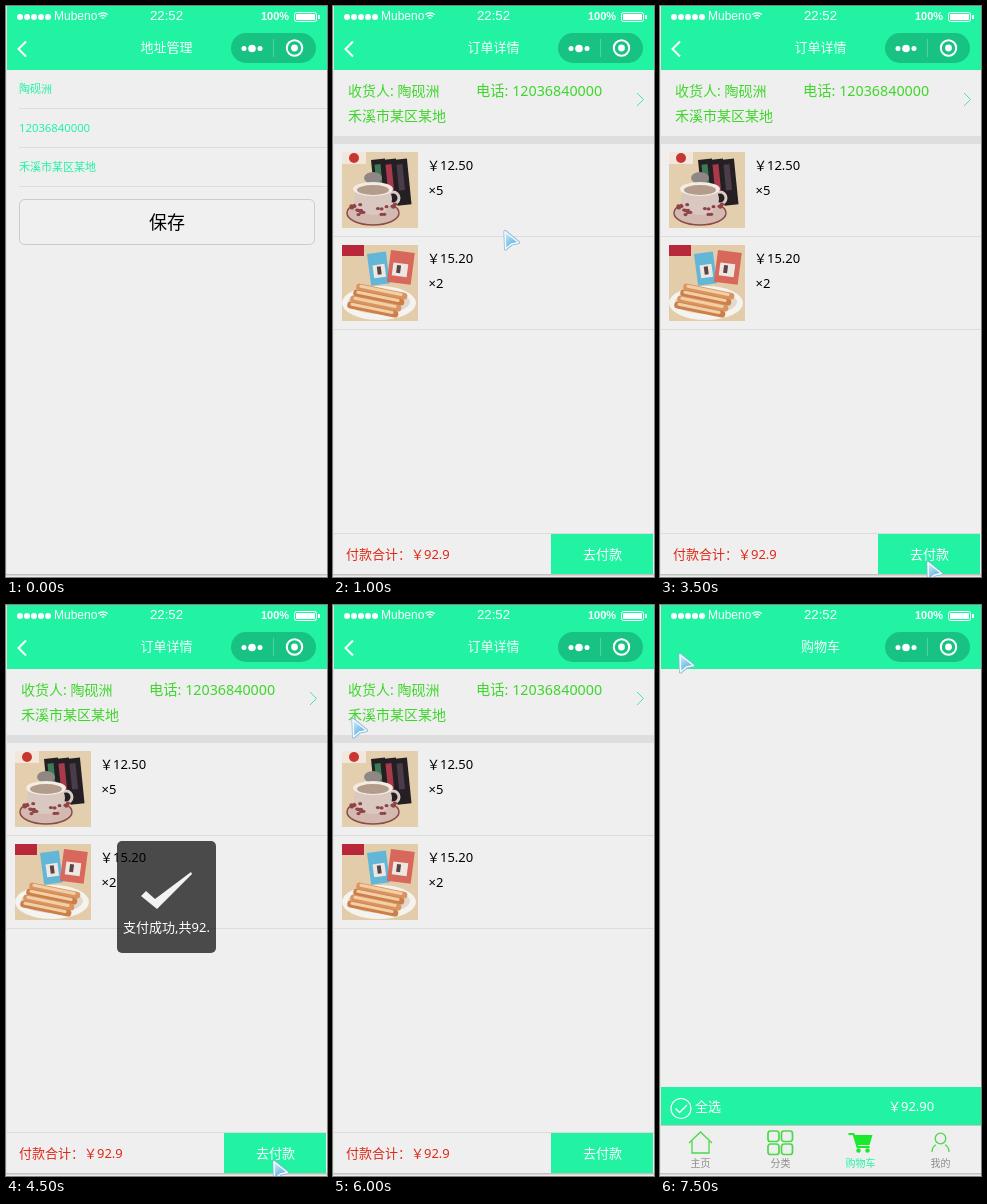
Recreate the animation shown at these times as an HTML page with a canvas. Size 321x571 px, loop 8000 ms.

```html
<!DOCTYPE html>
<html lang="zh-CN">
<head>
<meta charset="utf-8">
<title>订单支付</title>
<style>
html, body { margin: 0; width: 100%; height: 100%; overflow: hidden; background: #efefef; }
canvas { display: block; width: 321px; height: 571px; }
</style>
</head>
<body>
<canvas id="stage"></canvas>
<script>
const W = 321, H = 571, LOOP = 8000, MID = 160.5;
const MINT = '#22f3a3', PAPER = '#efefef', LINE = '#dcdcdc', GREEN = '#3fd62c';
const WHITE = '#fff', ICON = '#49d94b', CART = '#18ea2c';
const UI = '"Noto Sans", "Noto Sans CJK SC", "Noto Sans CJK", sans-serif';
const ARIAL = '"Liberation Sans", Arial, sans-serif';
const USER = '陶砚洲', PHONE = '12036840000', PLACE = '禾溪市某区某地', CARRIER = 'Mubeno';

const canvas = document.getElementById('stage');
const ratio = window.devicePixelRatio || 1;
canvas.width = W * ratio;
canvas.height = H * ratio;
const c = canvas.getContext('2d');
c.scale(ratio, ratio);

function times(n, draw) {
  for (let i = 0; i < n; i++) draw(i);
}

function seeded(seed) {
  return () => (seed = seed * 16807 % 2147483647) / 2147483647;
}

function rect(x, y, w, h, fill) {
  c.fillStyle = fill;
  c.fillRect(x, y, w, h);
}

function paint(fill, stroke, width = 1) {
  if (fill) { c.fillStyle = fill; c.fill(); }
  if (stroke) { c.strokeStyle = stroke; c.lineWidth = width; c.stroke(); }
}

function round(x, y, w, h, r, fill, stroke, width) {
  c.beginPath();
  c.roundRect(x, y, w, h, r);
  paint(fill, stroke, width);
}

function oval(x, y, rx, ry, fill, stroke, width) {
  c.beginPath();
  c.ellipse(x, y, rx, ry, 0, 0, 7);
  paint(fill, stroke, width);
}

function arc(x, y, r, from, to, stroke, width) {
  c.beginPath();
  c.arc(x, y, r, from, to);
  paint(null, stroke, width);
}

function path(points, fill, stroke, width) {
  c.beginPath();
  points.forEach(p => c.lineTo(...p));
  if (fill) c.closePath();
  paint(fill, stroke, width);
}

// (x, y) is the point of the arrow; a positive width opens to the right
function chevron(x, y, w, h, color, width) {
  path([[x + w, y - h], [x, y], [x + w, y + h]], null, color, width);
}

// Draws inside a local frame, leaning by the given angle
function place(x, y, angle, draw) {
  c.save();
  c.translate(x, y);
  c.rotate(angle);
  draw();
  c.restore();
}

// y is the vertical centre of the glyphs
function text(s, x, y, size, color, align = 'left', font = UI, weight = '') {
  c.font = `${weight} ${size}px ${font}`;
  c.textAlign = align;
  c.fillStyle = color;
  c.fillText(s, x, y + size * 0.37);
}

function statusBar() {
  times(5, i => oval(14 + i * 7, 11, 3, 3, WHITE));
  text(CARRIER, 48, 9.8, 12, WHITE, 'left', ARIAL);
  times(3, i => arc(97, 14, 2 + i * 2.6, -2.3, -0.84, WHITE, 1.3));
  text('22:52', MID, 9.5, 13.2, WHITE, 'center', ARIAL);
  text('100%', 255, 10.3, 11, WHITE, 'left', ARIAL, 'bold');
  round(288.5, 6.5, 22, 9, 2, null, WHITE);
  rect(290, 8, 19, 6, WHITE);
  rect(312, 9, 2, 4, WHITE);
}

function header(title, back) {
  rect(1, 0, 320, 64, MINT);
  statusBar();
  text(title, MID, 41.5, 13, '#f4fffb', 'center');
  if (back) chevron(12.5, 43, 7.5, 7.5, WHITE, 2);

  round(225, 27, 85, 30, 15, '#18c283');
  times(3, i => oval(238 + i * 8, 42.5, i === 1 ? 3.8 : 2.5, i === 1 ? 3.8 : 2.5, WHITE));
  rect(267, 33, 1, 18, '#4bd3a2');
  oval(288.5, 42, 7.7, 7.7, null, WHITE, 2);
  oval(288.5, 42, 3.4, 3.4, WHITE);
}

function addressPage() {
  header('地址管理', true);
  [USER, PHONE, PLACE].forEach((s, i) => {
    text(s, 13, 83 + i * 39, s === PHONE ? 11.3 : 11, MINT);
    rect(13, 102 + i * 39, 308, 1, LINE);
  });
  round(13.5, 193.5, 295, 45, 5, '#f0f0f0', '#cbcbcb');
  text('保存', 161, 216, 18, '#000', 'center');
}

// Product photos are drawn in a 76 px square
function coffeePhoto() {
  rect(0, 0, 76, 76, '#e3cfae');
  rect(0, 0, 24, 12, '#f3e6dc');
  oval(12, 6, 5, 5, '#c8372f');
  ['#3f7a58', '#a83a4c', '#4a3c48'].forEach((stripe, i) =>
    place(29 + i * 11, 8, -0.1, () => {
      rect(0, 0, 14, 46, '#241f22');
      rect(3, 5, 6, 26, stripe);
    }));
  oval(31, 61, 26, 12, '#d3b9b0', '#8c4a4a', 1.5);
  oval(51, 46, 6, 6, null, '#dccbc4', 3);
  oval(31, 47, 19, 16, '#d9c8c0');
  oval(31, 26, 9, 6, '#8f8784');
  oval(31, 37, 20, 7, '#f3ebe4');
  oval(31, 38, 16, 5, '#b39c8c');
  const rnd = seeded(7);
  times(22, () => {
    const a = rnd() * Math.PI;
    oval(31 + 22 * Math.cos(a), 52 + 16 * rnd() * Math.sin(a), 2, 1.6, '#8f4348');
  });
}

function sausagePhoto() {
  rect(0, 0, 76, 76, '#e2ccaa');
  rect(0, 0, 22, 11, '#b8283a');
  ['#62b6d7', '#d8685c'].forEach((wrap, i) =>
    place(25 + i * 24, 9 - i * 4, i ? 0.13 : -0.13, () => {
      rect(0, 0, 19 + i * 5, 32, wrap);
      rect(4, 12, 12 + i * 3, 13, '#eee6e2');
      rect(8, 14, 4, 8, '#5a4542');
    }));
  oval(37, 58, 37, 17, '#f5f3ef');
  oval(37, 57, 31, 12, '#e2d8cc');
  times(4, i => place(15 - i * 3, 38 + i * 6, 0.2, () => {
    round(0, 0, 52, 7, 3.5, i % 2 ? '#cd7f4a' : '#d99460');
    round(3, 1, 44, 3, 1.5, '#f2cfa4');
  }));
}

function productRow(photo, price, count, y) {
  place(9, y + 8, 0, photo);
  text(price, 94, y + 21, 13, '#000');
  text(count, 95.5, y + 46, 13, '#000');
  rect(1, y + 92, 320, 1, LINE);
}

function orderPage() {
  header('订单详情', true);
  text('收货人: ' + USER, 15, 85, 14, GREEN);
  text('电话: ' + PHONE, 143, 85, 14.3, GREEN);
  text(PLACE, 15, 110, 14, GREEN);
  chevron(310.5, 93.5, -6.5, 6.5, '#4fdfb0', 1);
  rect(1, 130, 320, 8, '#dedede');
  productRow(coffeePhoto, '￥12.50', '×5', 138);
  productRow(sausagePhoto, '￥15.20', '×2', 231);
  rect(1, 527, 320, 1, LINE);
  text('付款合计：￥92.9', 13, 548, 13, '#e02818');
  rect(218, 528, 102, 40, MINT);
  text('去付款', 269.5, 548, 13, WHITE, 'center');
}

function toast() {
  round(111, 236, 99, 112, 5, 'rgba(0,0,0,.69)');
  place(135, 267, 0, () =>
    path([[0, 24], [5, 19], [14, 27], [50, 0], [51, 2], [16, 37]], '#f2f2f2'));
  text('支付成功,共92.', MID, 322, 13, WHITE, 'center');
}

function homeIcon() {
  path([[-11.5, 0], [0, -11], [11.5, 0]], null, ICON, 1.3);
  path([[-8.5, -2], [-8.5, 10], [8.5, 10], [8.5, -2]], null, ICON, 1.3);
}

function gridIcon() {
  times(4, i => round(-12.5 + i % 2 * 13.5, -12 + (i >> 1) * 13, 11, 10.5, 2.5, null, ICON, 1.7));
}

function cartIcon() {
  path([[-12, -9], [-7, -9], [-3, 4], [9, 4]], null, CART, 2);
  path([[-6.5, -8], [12, -8], [9, 2], [-4, 2]], CART);
  times(2, i => oval(-2 + i * 9, 7.5, 2.2, 2.2, CART));
}

function personIcon() {
  oval(0, -4.5, 5.3, 5.3, null, ICON, 1.3);
  arc(0, 9, 8.5, Math.PI, Math.PI * 1.32, ICON, 1.3);
  arc(0, 9, 8.5, Math.PI * 1.68, 0, ICON, 1.3);
}

function cartPage() {
  header('购物车', false);
  rect(1, 482, 320, 38, MINT);
  oval(21, 503.5, 10, 10, null, WHITE, 1.2);
  path([[15.5, 503.5], [19.5, 507.5], [27, 500]], null, WHITE, 1.4);
  text('全选', 35, 501, 13, WHITE);
  text('￥92.90', 228, 501, 13, WHITE);
  rect(1, 520, 320, 1, '#c6c6c6');

  const tabs = { 主页: homeIcon, 分类: gridIcon, 购物车: cartIcon, 我的: personIcon };
  Object.entries(tabs).forEach(([label, icon], i) => {
    const x = 40.5 + i * 80;
    place(x, 538, 0, icon);
    text(label, x, 558.5, 10, icon === cartIcon ? MINT : '#8d8d8d', 'center');
  });
}

function pointer(x, y) {
  const shape = [[2, 1.5], [15.5, 12.5], [8.5, 14], [2.5, 19]];
  const shine = c.createLinearGradient(2, 4, 10, 14);
  shine.addColorStop(0, '#c9e9fb');
  shine.addColorStop(1, '#6fb9e2');
  place(x, y, 0, () => {
    c.lineJoin = 'round';
    path(shape, '#7fb3d2', '#7fb3d2', 3);
    path(shape, shine, '#f2faff', 1.6);
  });
}

function phoneEdge() {
  rect(0, 0, 1, 568, '#e2e2d9');
  ['#c2c2c2', '#d6d6d4', '#ecece9'].forEach((shade, i) => rect(0, 568 + i, W, 1, shade));
}

// The screen grabs the pointer twice a second, so it jumps between stops
function pointerAt(t) {
  if (t < 500) return null;
  if (t < 2500) return [170, 224];
  if (t < 3000) return [170, 234];
  if (t < 3500) return [186, 384];
  if (t < 6000) return [266, 555];
  return [18, t < 6500 ? 113 : 48];
}

function draw(t) {
  rect(0, 0, W, H, PAPER);
  if (t < 1000) addressPage();
  else if (t < 7500) orderPage();
  else cartPage();
  if (t >= 4500 && t < 5000) toast();
  phoneEdge();
  const spot = pointerAt(t);
  if (spot) pointer(...spot);
}

const start = performance.now();
function tick() {
  draw((performance.now() - start) % LOOP);
  requestAnimationFrame(tick);
}
tick();
</script>
</body>
</html>
```
